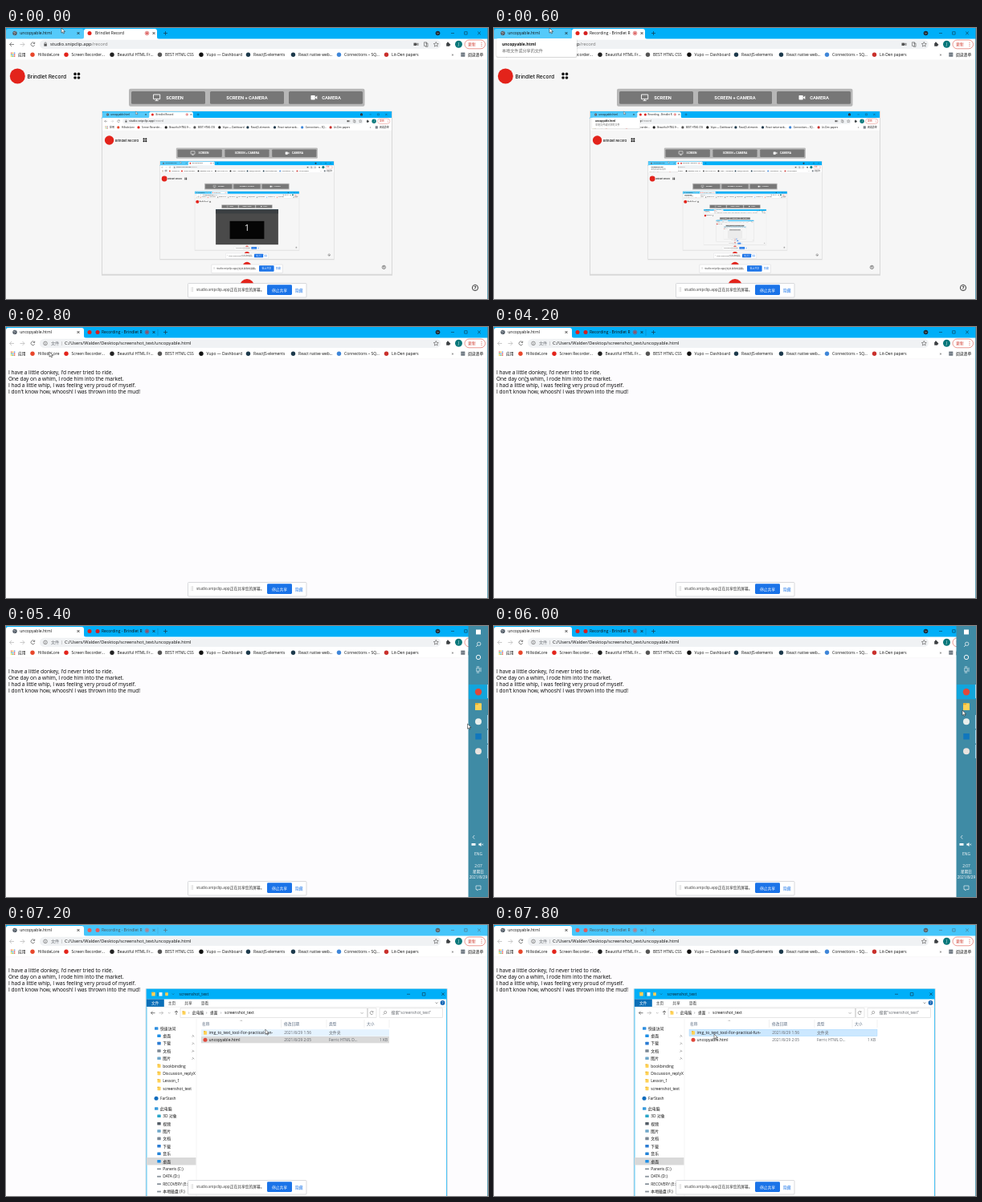
Animation, 600 px wide and 338 px high, one loop 8 s. Source, as an HTML page:

```html
<!DOCTYPE html>
<html lang="zh-CN">
<head>
<meta charset="utf-8">
<title>Screen recording</title>
<style>
html, body { margin: 0; width: 100%; height: 100%; overflow: hidden; background: #fdfcfe; }
svg { display: block; width: 100vw; height: 100vh; }
text { font-family: "Open Sans", "Noto Sans CJK SC", "Noto Sans CJK", sans-serif; white-space: pre; }
</style>
</head>
<body>
<svg id="stage" viewBox="0 0 600 338" preserveAspectRatio="none"></svg>
<script>
const LOOP = 8000, STEP = 200;
const BLUE = '#00aff8', INK = '#111', GREY = '#63676d', RED = '#e3231b', YELLOW = '#ffd257', TEAL = '#3f8ba5';
const T_REC = 200, T_TIP = 400, T_TAB = 1400, T_BAR = 5400, T_HOVER = 6200, T_WIN = 6600, T_ROW = 7200, T_HIDE = 7200, T_PICK = 7800;

const rect = (x, y, w, h, fill, more = '') => `<rect x="${x}" y="${y}" width="${w}" height="${h}" fill="${fill}" ${more}/>`;
const dot = (x, y, r, fill, more = '') => `<circle cx="${x}" cy="${y}" r="${r}" fill="${fill}" ${more}/>`;
const line = (d, color = INK, width = .7) => `<path d="${d}" fill="none" stroke="${color}" stroke-width="${width}"/>`;
const text = (x, y, s, size = 4.8, fill = INK, more = '') => `<text x="${x}" y="${y}" font-size="${size}" fill="${fill}" ${more}>${s}</text>`;
const mid = (x, y, s, size, fill, more = '') => text(x, y, s, size, fill, `text-anchor="middle" ${more}`);
const when = (from, to, body) => `<g data-on="${from}" data-off="${to}">${body}</g>`;
const close = (x, y, r = 1.5, c = INK) => line(`M${x - r} ${y - r}l${2 * r} ${2 * r}m0 ${-2 * r}l${-2 * r} ${2 * r}`, c);
const ring = (x, y, r, c = INK, w = .7) => dot(x, y, r, 'none', `stroke="${c}" stroke-width="${w}"`);
const folder = (x, y, s = 1) => rect(x - 2 * s, y - 2.2 * s, 4 * s, 4.4 * s, YELLOW, 'rx=".4"') + rect(x - 2 * s, y - 2.2 * s, 2 * s, 1 * s, '#e8ae2c');
const globe = (x, y) => dot(x, y, 2.7, '#4f5964') + line(`M${x - 1.8} ${y - .8}h1.8l.8 1.2M${x + .4} ${y - 1.8}h1M${x - .9} ${y + 1.4}h1`, '#fff', .5);
const arrow = '<path d="M0 0V6.2L1.5 4.9L2.5 7L3.5 6.5L2.6 4.5H4.6Z" fill="#fff" stroke="#111" stroke-width=".5"/>';

const windowFrame = () => rect(0, 0, 600, 14, BLUE)
  + dot(537.5, 6.5, 2.8, '#1b2a33') + line('M536.3 6l1.2 1.2l1.2-1.2', '#fff', .5)
  + line('M554 6.5h4M570.7 4.7h3.4v3.4h-3.4z', '#12384a', .6) + close(589, 6.4, 1.8, '#12384a')
  + line('M196 6.5h5M198.5 4v5', '#163c50');

const tabShape = (x, w, fill) => `<path d="M${x - 3} 14q3 0 3-3V4q0-3 3-3h${w - 6}q3 0 3 3v7q0 3 3 3z" fill="${fill}"/>`;

const tabs = second => {
  const recording = dot(114, 6.5, 2.5, '#d51f1f') + text(119, 8.4, 'Recording - Brindlet R', 5);
  return (second ? tabShape(0, 97, '#55cafa') + tabShape(97, 91, '#fff') : tabShape(0, 97, '#fff') + line('M189 3v8', '#0b7fb5', .5))
    + globe(11, 6.5) + text(17.2, 8.4, 'uncopyable.html', 5.1) + close(90, 6.5)
    + dot(104, 6.5, 2.5, RED)
    + (second ? when(0, T_REC, text(111, 8.4, 'Brindlet Record', 5)) + when(T_REC, LOOP, recording) : recording)
    + ring(175.5, 6.5, 2.3, '#d02a2a', .6) + dot(175.5, 6.5, 1.2, '#d02a2a') + close(184, 6.5);
};

// icon x, icon colour, label
const bookmarks = [
  [33, '#e8472b', 'HillsideLore'], [75, RED, 'Screen Recorder...'], [132, '#222', 'Beautiful HTML Fr...'],
  [191.5, '#555', 'BEST HTML CSS'], [243, '#111', 'Vupo — Dashboard'], [301.5, '#1d3a4c', 'ReactJS-elements'],
  [357.5, '#1d3a4c', 'React native web...'], [414.5, '#3f86d8', 'Connections – SQ...'], [473.5, '#c9302c', 'Lit-Den papers']
];
const appColors = ['#ea4335', '#fbbc05', '#4285f4', '#34a853', '#4285f4', '#ea4335', '#fbbc05', '#34a853', '#ea4335'];

const toolbar = (address, backColor) => rect(0, 13.5, 600, 26.5, '#fff')
  + line('M10 20.5H4.5M7 18L4.5 20.5L7 23', backColor)
  + line('M17.5 20.5H23M20.5 18L23 20.5L20.5 23', '#b5b5b5')
  + line('M35.3 18.8a2.4 2.4 0 1 0 .4 2.4M35.7 17.6v1.9h-1.9', '#555')
  + rect(42, 14.7, 499, 11.4, '#f0f2f4', 'rx="5.7"') + address
  + `<path d="M535.3 17.4l.9 2 2.1.2-1.6 1.4.5 2.1-1.9-1.1-1.9 1.1.5-2.1-1.6-1.4 2.1-.2z" fill="none" stroke="#555" stroke-width=".6"/>`
  + rect(548.2, 18.8, 4, 4, '#3c4043', 'rx=".6"') + dot(550, 18.5, 1, '#3c4043') + dot(552.4, 20.8, .9, '#3c4043')
  + dot(563.5, 20.3, 4.5, '#08777a') + mid(563.5, 22.2, 'J', 5, '#fff')
  + rect(571, 15, 25.5, 10.8, '#fff', 'rx="5.4" stroke="#e16a60" stroke-width=".7"') + text(575, 22.2, '更新', 4.9, '#d03c30')
  + [18.2, 20.4, 22.6].map(y => dot(592, y, .5, '#d03c30')).join('')
  + appColors.map((c, i) => rect(6 + i % 3 * 2, 30.6 + (i / 3 | 0) * 2, 1.3, 1.3, c)).join('')
  + text(15, 35.2, '应用', 4.8)
  + bookmarks.map(([x, c, s]) => dot(x, 33.3, 2.7, c) + text(x + 6.6, 35.1, s, 4.93)).join('')
  + text(554.5, 35.2, '»', 5.5, '#444')
  + rect(566.3, 30.7, 5, 5, '#56616c') + line('M566.3 32.4h5M566.3 34h5', '#fff', .4) + text(575, 35.2, '阅读清单', 4.8)
  + line('M0 40h600', '#e3e3e6', .4);

const shareBar = () => rect(226.5, 318.5, 147.5, 17.5, '#fff', 'stroke="#c9cbce" stroke-width=".7" rx="1"')
  + [324, 326, 328].map(y => dot(231, y, .4, '#777') + dot(232.7, y, .4, '#777')).join('')
  + text(237, 328.4, 'studio.snipclip.app正在共享您的屏幕。', 4.75, '#333')
  + rect(325, 320.3, 31, 12.6, '#1a73e8', 'rx="1.3"') + mid(340.5, 328.5, '停止共享', 4.8, '#fff')
  + text(360, 328.5, '隐藏', 4.8, '#1a73e8');

const siteAddress = rect(47.4, 19.8, 3.4, 2.8, '#555') + line('M48 20v-1a1.1 1.1 0 0 1 2.2 0v1', '#555', .6)
  + text(55, 22.4, 'studio.snipclip.app<tspan fill="#777">/record</tspan>', 5.9)
  + rect(507.5, 18.6, 3.6, 3.4, '#555') + line('M511 20.3l2-1.4v2.8z', '#555')
  + line('M520.5 17.8h3v4.6h-3zM522 19h3v4.3h-3', '#555', .6);

const button = (x, label, cx) => rect(x, 79, 92, 15.8, '#777', 'rx="1.5"')
  + mid(cx, 88.9, label, 5.8, '#fff', 'font-weight="700" style="font-family:Roboto,sans-serif"');

const countdown = () => rect(0, 0, 600, 338, '#4a4a4a') + rect(0, 0, 600, 40, '#3b3f42')
  + rect(135, 112, 330, 172, '#050505') + mid(300, 206, '1', 82, '#fff');

// The recorder page contains a live picture of the whole screen.
const recorder = depth => windowFrame() + tabs(true) + toolbar(siteAddress, '#555')
  + rect(0, 40, 600, 298, '#f6f6f6')
  + dot(14.3, 60, 9.5, RED)
  + text(26.5, 62.6, 'Brindlet Record', 6.6, '#111', 'font-weight="500" style="font-family:Inter,sans-serif"')
  + [[86, 57.4], [90.5, 57.4], [86, 62], [90.5, 62]].map(([x, y]) => dot(x, y, 1.8, '#111')).join('')
  + rect(153, 75.8, 293.5, 22, '#b7b7b7', 'rx="2"')
  + button(156, 'SCREEN', 210) + button(254, 'SCREEN + CAMERA', 300) + button(352, 'CAMERA', 405)
  + line('M183.5 83h8.2v5.6h-8.2zM187.6 88.6v2M185.5 90.6h4.2', '#fff', .9)
  + rect(379.5, 84, 5.2, 5.4, '#fff', 'rx=".7"') + '<path d="M384.5 86.7l2.8-2.2v4.4z" fill="#fff"/>'
  + dot(300, 322, 9, RED)
  + rect(119, 103.5, 362, 205.3, '#000', 'opacity=".12"')
  + `<g transform="translate(120 104) scale(.6)">${depth < 6 ? recorder(depth + 1) : rect(0, 0, 600, 338, '#ececec')}</g>`
  + ring(584, 324, 3.6, '#111', .8) + mid(584, 326, '?', 5.5, '#111', 'font-weight="700"')
  + shareBar()
  + when(T_TIP, T_TAB, rect(2.5, 13.5, 101, 23.5, '#000', 'rx="2" opacity=".16"') + rect(3, 13, 100, 23, '#fff', 'rx="2"')
    + text(10, 22.2, 'uncopyable.html', 5, INK, 'font-weight="700"') + text(10, 30.2, '本地文件或分享的文件', 5.1, '#666'))
  + (depth ? `<g transform="translate(69 0)">${arrow}</g>` : '')
  + (depth === 4 ? when(0, T_REC, countdown()) : '');

const poem = ["I have a little donkey, I'd never tried to ride.", 'One day on a whim, I rode him into the market.',
  'I had a little whip, I was feeling very proud of myself.', "I don't know how, whoosh! I was thrown into the mud!"];

const fileAddress = ring(49, 20.4, 2.3, '#555', .6) + line('M49 20v1.6M49 18.9v.5', '#555', .6)
  + text(56, 22.3, '文件', 5.1, GREY) + line('M69.5 18v5', '#aaa', .5)
  + text(73, 22.3, 'C:/Users/Walder/Desktop/screenshot_text/uncopyable.html', 5.7);

const reader = () => windowFrame() + tabs(false)
  + when(T_WIN, LOOP, `<path d="M94 0h506v14H100q-3 0-3-3V4q0-3-3-4z" fill="#fff" opacity=".27"/>`)
  + toolbar(fileAddress, '#b5b5b5')
  + rect(0, 40.2, 600, 298, '#fdfcfe')
  + poem.map((s, i) => text(3, 58.5 + i * 8.05, s, 6.54, '#000')).join('');

// y, label, icon colour, indent
const places = [
  [129, '快速访问', '#2f8fe0', 0], [138.3, '桌面', '#1e8fe6', 1], [147.6, '下载', '#2b7cd3', 1], [157, '文档', '#7c8894', 1],
  [166.3, '图片', '#6fa7c9', 1], [175.8, 'bookbinding', 0, 1], [185, 'Discussion_replyX', 0, 1], [194.4, 'Lesson_1', 0, 1],
  [204, 'screenshot_text', 0, 1], [216.3, 'FarStash', '#0f6cbd', 0], [229, '此电脑', '#3a9bdc', 0], [238.3, '3D 对象', '#29a5c9', 1],
  [247.7, '视频', '#525c66', 1], [257, '图片', '#6fa7c9', 1], [266.4, '文档', '#7c8894', 1], [275.8, '下载', '#2b7cd3', 1],
  [285.2, '音乐', '#2484d8', 1], [294.7, '桌面', '#1e8fe6', 1], [304, 'Paneris (C:)', '#89939c', 1], [313.4, 'DATA (D:)', '#89939c', 1],
  [322.8, 'RECOVERY (E:)', '#89939c', 1], [332.2, '本地磁盘 (F:)', '#89939c', 1]
];
const placeIcon = (x, y, c) => !c ? folder(x, y) : c === '#89939c' ? rect(x - 2.4, y - .6, 4.8, 1.8, c) : rect(x - 2.2, y - 1.8, 4.4, 3.6, c, 'rx=".5"');
const place = ([y, s, c, deep], i) => (c === '#0f6cbd' ? dot(187, y, 2.5, c) : placeIcon(deep ? 190.5 : 187.2, y, c))
  + text(deep ? 195.3 : 192, y + 1.8, s, 4.87)
  + (i > 0 && i < 5 ? line(`M231.5 ${y + 1.6}l1.6-1.6m-1-1.2l2.2 2.2`, '#777', .6) : '');

const fileRow = (y, name, date, kind) => text(252.5, y, name, 5) + text(346.3, y, date, 4.85, GREY) + text(402, y, kind, 4.85, GREY);

const explorer = () => rect(173.5, 79, 376.5, 262, '#000', 'opacity=".1" rx="1"') + rect(175, 80, 373.5, 262, '#fff', `stroke="${BLUE}" stroke-width=".7"`)
  + rect(175, 80, 373.5, 12.5, BLUE)
  + folder(183.5, 86.2, 1.1) + rect(190.5, 84, 4, 4.6, '#e9f3f8') + folder(200, 86.2, .9) + line('M206.8 85.5l1.3 1.3l1.3-1.3M189 84v5', '#174a61', .5)
  + text(215.5, 88, 'screenshot_text', 5, '#0c2430')
  + line('M499 86.3h4M518.3 84.5h3.6v3.6h-3.6z', '#12384a', .6) + close(544, 86.2, 1.7, '#12384a')
  + rect(175, 92.5, 21.8, 9.5, '#0b6fb8') + mid(185.8, 99, '文件', 4.7, '#fff')
  + ['主页', '共享', '查看'].map((s, i) => mid(206.5 + i * 20.5, 99, s, 4.7, '#333')).join('')
  + line('M534.5 96.5l1.5 1.5l1.5-1.5', '#666', .6) + dot(543.5, 97, 2.9, '#1566b5') + mid(543.5, 98.8, '?', 4.6, '#fff')
  + line('M175 102.3h373.5', '#e2e2e2', .5)
  + line('M185.5 109.7h-5M182.5 107.7l-2 2l2 2M212 112v-5M210 109l2-2l2 2', '#444')
  + line('M190.5 109.7h5M193.5 107.7l2 2l-2 2M202 109l1.3 1.3l1.3-1.3', '#aaa')
  + rect(217, 103.8, 244, 11.7, '#fff', 'stroke="#d6d6d6" stroke-width=".6"') + folder(221.5, 109.6)
  + text(227, 111.4, '›', 4.8, GREY) + text(232, 111.4, '此电脑', 4.75) + text(249, 111.4, '›', 4.8, GREY)
  + text(254, 111.4, '桌面', 4.75) + text(267, 111.4, '›', 4.8, GREY) + text(272, 111.4, 'screenshot_text', 5)
  + line('M441.5 109l1.6 1.6l1.6-1.6M450 104v11', '#777', .5) + line('M456.8 108.4a2 2 0 1 0 .2 2M457 107.3v1.5h-1.5', '#555', .5)
  + rect(465, 103.8, 78.5, 11.7, '#fff', 'stroke="#d6d6d6" stroke-width=".6"') + ring(472.2, 109, 1.6, '#666', .5) + line('M471 110.3l-1.6 1.7', '#666', .5)
  + text(479.5, 111.4, '搜索"screenshot_text"', 4.9, GREY)
  + rect(175, 290, 62, 9.4, '#d9d9d9') + places.map(place).join('')
  + rect(236.5, 117, 311.5, 222, '#fff') + line('M237 117v221', '#e8e8e8', .5)
  + [[244, '名称'], [346, '修改日期'], [402, '类型'], [449, '大小']].map(([x, s]) => text(x, 124.8, s, 4.75, '#5a6b80')).join('')
  + line('M291.5 120l1.3-1.3l1.3 1.3', '#777', .5) + line('M342.5 118v10M399 118v10M446 118v10M477 118v10', '#e0e0e0', .5)
  + when(0, T_PICK, rect(243, 139, 234, 8.3, '#d9d9d9'))
  + when(T_ROW, T_PICK, rect(243, 130.2, 234, 8.5, '#e5f3ff'))
  + when(T_PICK, LOOP, rect(243, 130.2, 234, 8.5, '#cce8ff', 'stroke="#99d1ff" stroke-width=".4"'))
  + folder(248, 134.5) + fileRow(136.4, 'img_to_text_tool-For-practical-fun-', '2021/8/29 1:56', '文件夹')
  + dot(248, 143.2, 2.5, '#e0483a') + fileRow(145, 'uncopyable.html', '2021/8/29 2:05', 'Ferric HTML D...') + text(465, 145, '1 KB', 4.85, GREY);

const taskbar = () => rect(575.5, 0, 24.5, 338, TEAL)
  + rect(585, 4.5, 6, 6, '#fff')
  + ring(588.7, 22.3, 2.2, '#fff') + line('M587 24l-2 2', '#fff') + ring(588, 39, 2.7, '#fff', .9)
  + line('M585.8 52.3h3.4v4.4h-3.4zM591 51.8v5.4M585.8 50.8h3.4M585.8 58.2h3.4', '#fff', .6)
  + when(0, T_WIN, rect(576, 73, 24, 18.3, '#11a5dc')) + when(T_WIN, LOOP, rect(576, 73, 24, 18.3, '#4f9bb4'))
  + when(T_HOVER, LOOP, rect(576, 91.6, 24, 18, '#79b4c7'))
  + dot(588, 82.3, 4.2, '#e0483a') + folder(588, 100.7, 2)
  + dot(588, 119.3, 4, '#e9efec') + rect(584.3, 134, 7.5, 7.5, '#1177bd') + dot(588, 156.2, 4, '#e9e3df')
  + [73, 111, 129.5, 148].map(y => rect(599, y, 1, 17, '#a6dcf2')).join('')
  + line('M583.2 261l-2 2.3l2 2.3', '#fff') + rect(579.5, 271, 5, 2.8, '#fff')
  + '<path d="M588.3 271.5h1.3l1.8-1.4v4.8l-1.8-1.4h-1.3z" fill="#fff"/>' + close(593, 272.5, .9, '#fff')
  + mid(588, 286, 'ENG', 4.8, '#fff') + mid(588, 300.8, '2:07', 4.8, '#fff') + mid(588, 307.8, '星期日', 4.7, '#fff') + mid(588, 314.6, '2021/8/29', 4.8, '#fff')
  + line('M585 324h6v4.6h-3l-1.4 1.4v-1.4H585z', '#fff', .6);

// time, x, y of the pointer tip
const pointerPath = [[0, 69, 0], [2400, 69, 0], [3200, 39, 62], [4400, 39, 62], [4800, 60, 70], [5000, 140, 82],
  [5400, 574.5, 122], [5800, 580, 112], [6200, 586, 98.5], [6600, 586, 98.5], [7400, 274, 136], [LOOP, 274, 136]];

const stage = document.getElementById('stage');
stage.innerHTML = when(0, T_TAB, recorder(0))
  + when(T_TAB, LOOP, reader() + when(T_WIN, LOOP, explorer()) + shareBar())
  + rect(599.2, 0, .8, 338, TEAL)
  + when(T_BAR, T_HIDE, taskbar())
  + `<g id="pointer">${arrow}</g>`;
const pointer = document.getElementById('pointer');
const timed = [...stage.querySelectorAll('[data-on]')].map(el => ({ el, on: +el.dataset.on, off: +el.dataset.off }));

function draw(t) {
  for (const { el, on, off } of timed) el.style.display = t >= on && t < off ? '' : 'none';
  const i = pointerPath.findIndex(p => p[0] > t);
  const [t0, x0, y0] = pointerPath[i - 1], [t1, x1, y1] = pointerPath[i];
  const u = (t - t0) / (t1 - t0), k = u * u * (3 - 2 * u);
  pointer.setAttribute('transform', `translate(${x0 + (x1 - x0) * k} ${y0 + (y1 - y0) * k})`);
}

const start = performance.now();
let shown = -1;
function tick() {
  const t = Math.floor((performance.now() - start) % LOOP / STEP) * STEP;
  if (t !== shown) draw(shown = t);
  requestAnimationFrame(tick);
}
tick();
</script>
</body>
</html>
```
